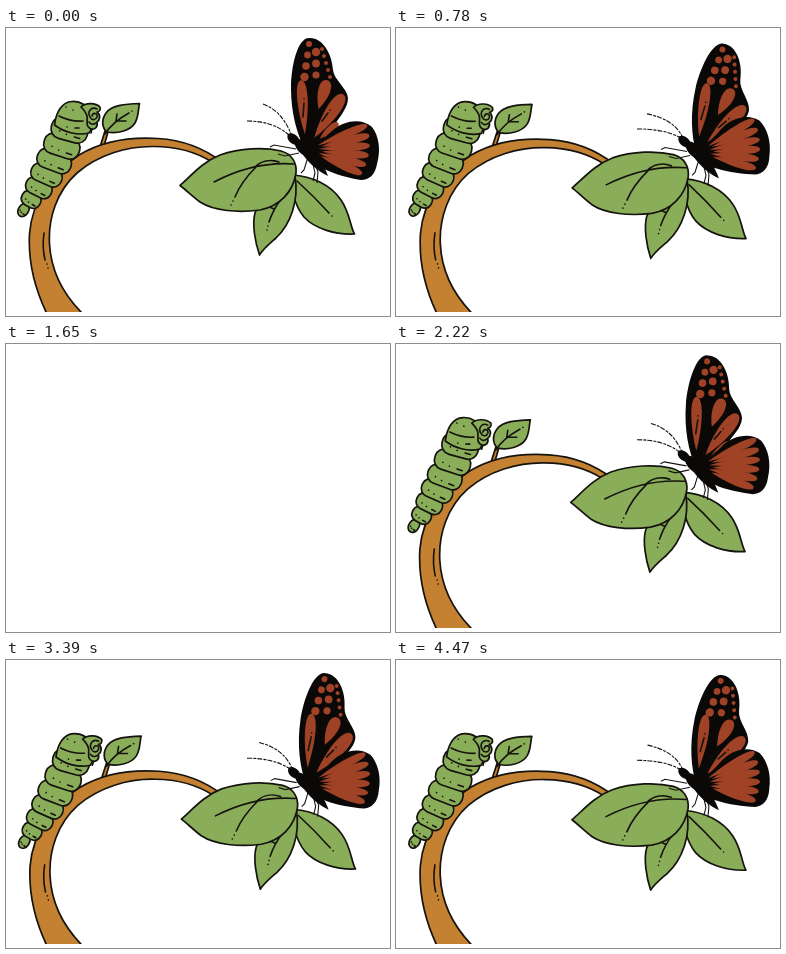
Write an HTML page that moves like this. It is 384 by 288 pixels and loops after 4.5 s.

```html
<!DOCTYPE html>
<html>
<head>
<meta charset="utf-8">
<style>
html, body { margin: 0; width: 100%; height: 100%; overflow: hidden; background: #fff; }
svg { display: block; width: 100vw; height: 100vh; }
.ink { fill: none; stroke: #15130e; stroke-width: 1.6; stroke-linecap: round; stroke-linejoin: round; }
.green { fill: #8aad5a; }
.wood { fill: #c58132; }
.green, .wood { stroke: #15130e; stroke-width: 1.7; stroke-linejoin: round; }
.black { fill: #0b0908; }
.rust { fill: #a04226; }
.thin { fill: none; stroke: #15130e; stroke-width: 1.1; }
</style>
</head>
<body>
<svg viewBox="0 0 384 288">
  <clipPath id="floor"><rect width="384" height="284"/></clipPath>
  <g id="scene" clip-path="url(#floor)">
    <g id="plant">
      <path class="wood" d="M94 119L99 103 102 104 98 118Z"/>
      <path class="wood" d="M42 288C29 262 22 235 23.500 206C26 172 47 144 73 127C98 112 128 109 152 110.500C177 112 199 121 216 134L206 134C190 124 169 118.500 148 118.500C121 118 92 127 71 145C51 163 42 190 43.500 216C45 243 57 267 79 288Z"/>
      <path class="ink" d="M38 205Q36 219 39 232M41 236v.1M42 240v.1"/>
      <path class="green" d="M133.500 75.500C120 76 106 77 100 85C95 92 96 100 101 104C111 106 124 103 129 95C133 88 132 81 133.500 75.500Z"/>
      <path class="ink" d="M99 106C104 98 112 91 123 85M110 93L111 86M111 93L120 93M126 83v.1"/>
      <g id="worm"></g>
      <path class="green" d="M48.500 97C50 84 56 74 66 73.500C75 73 81 78 84 85C87 94 87 101 83 105C71 108 58 104 48.500 97Z"/>
      <path class="ink" d="M53 88Q65 94 77 93M60 79v.1M67 82v.1M61 99v.1M69 100h4"/>
      <path class="green" d="M75 79C80 74 90 75 94 79C95 82 93 84 91 84C95 87 94 92 91 94C92 99 89 102 85 101C79 98 82 94 81 88C80 84 78 82 75 79Z"/>
      <path class="ink" d="M91 81C85 78 81 84 84 89C86 93 90 92 91 89C92 85 87 84 86 88M83 94Q86 98 90 95M86 101L85 105"/>
    </g>
    <g id="leaves">
      <path class="green" d="M286 147C306 148 325 157 335 172C344 185 344 198 348.500 206C330 207 309 201 298 189C288 177 285 160 286 147Z"/>
      <path class="ink" d="M291 153C301 162 313 174 323 185M326 188v.1"/>
      <path class="green" d="M289 148C293 172 285 196 270 210C262 217 257 221 253.500 227C249 214 246 196 249 185C253 172 270 160 289 148Z"/>
      <path class="ink" d="M275 171C269 179 265 188 263 194M262 198v.1M261 202v.1M268 181L259 177"/>
      <path class="green" d="M174 157.500C184 149 196 134 214 127C234 120 258 119 275 123C286 126 291 135 290 145C287 164 274 178 254 182C232 185 208 183 194 174C186 168 180 162 174 157.500Z"/>
      <path class="ink" d="M288 136C260 134 233 141 208 154M250 139C241 148 233 159 229 169M227 173v.1M225 177v.1M249 139C255 133 264 131 273 134"/>
    </g>
    <path id="feelers" class="thin" stroke-dasharray="5 1.200 3 1"/>
    <g id="fly">
      <path class="thin" d="M290 121L268 117 264 119M293 125L279 128 272 126M302 129L298 142 295 145M306 132L309 145 307 153M308 132L312 144 311 155"/>
      <path class="black" d="M299 116C309 121 317 135 322 148C313 144 303 136 295 124Z"/>
      <g id="upper">
        <path class="black" d="M300 123C291 107 285 85 285 60C285 40 291 10 303 10C316 9 326 25 327 42C328 52 341 60 342 70C342 80 334 88 328 98C320 110 310 117 300 123Z"/>
        <g id="panes" class="rust"></g>
        <path class="ink" d="M297 89L298 75M298 71v.1M316 93L322 85M324 82v.1"/>
      </g>
      <g id="lower">
        <path class="black" d="M298 122C308 116 319 110 326 103C338 92 356 90 366 99C373 108 375 122 371 136C369 147 363 152 355 152C343 150 328 146 318 141C308 137 300 130 298 122Z"/>
        <g id="fan" class="rust"></g>
      </g>
      <path class="black" d="M282 106C286 104 291 107 293 111C299 112 305 118 307 126C308 131 305 131 301 129C294 126 290 121 289 117C283 115 280 110 282 106Z"/>
    </g>
  </g>
</svg>
<script>
const $ = id => document.getElementById(id);
const repeat = (n, make) => Array.from({ length: n }, (_, i) => make(i)).join('');
const STEP = 30, LOOP = 4500, SWAY = 1920, BLANK = 1650;

// Body ring; k runs from tail (0) to neck (1)
function ring(k) {
  const x = 17.5 + 46 * k, y = 182 - 60 * k - 20 * k * k;
  const w = 5 + 13.5 * (1 - (1 - k) ** 2.5), h = 7 + 4 * k;
  return `<g transform="translate(${x} ${y}) rotate(${32 - 17 * k})">
    <rect class="green" x="${-w}" y="${-h}" width="${2 * w}" height="${2 * h}" rx="${h * .9}"/>
    <path class="ink" d="M${-w * .5} ${h * .3}v.1M${-w * .1} ${h * .45}v.1M${w * .35} ${h * .5}h${w * .3}"/>
  </g>`;
}

// Teardrop cell of a wing, pointing away from the wing root
const cell = (angle, from, to, w) => {
  const mid = (from + to) / 2;
  return `<path transform="translate(300 122) rotate(${angle})"
    d="M${from} 0C${mid} ${-w} ${to} ${-w} ${to} 0S${mid} ${w} ${from} 0Z"/>`;
};

const dot = (x, y, r) => `<circle cx="${x}" cy="${y}" r="${r}"/>`;

$('worm').innerHTML = repeat(7, i => ring(i / 6));
$('fan').innerHTML = repeat(6, i => cell(-22 + 9 * i, 13 + 3 * (i % 2), 66 - i, 5.4));
$('panes').innerHTML =
  cell(-94, 16, 70, 7) + cell(-73, 43, 73, 8) + cell(-56, 15, 67, 9) + cell(-40, 18, 42, 5) +
  repeat(4, i => dot(303 - 1.5 * i, 16 + 11 * i, 3 + .4 * i)) +
  repeat(3, i => dot(310, 24 + 11.5 * i, 4.2 - .3 * i)) +
  repeat(5, i => dot(316 + 2 * i, 21 + 7 * i, 2));

const move = (id, value) => $(id).setAttribute('transform', value);

function draw(time) {
  const t = Math.floor((time % LOOP) / STEP) * STEP;
  const wave = (1 - Math.cos(2 * Math.PI * t / SWAY)) / 2;
  const p = Math.sin(wave * Math.PI / 2);
  const turn = `rotate(${.7 * p} 55 284)`;

  $('scene').style.display = t === BLANK ? 'none' : '';
  move('plant', turn);
  move('leaves', `translate(${.6 * p} ${p}) ${turn}`);
  move('fly', `translate(${p} ${2.5 * p})`);
  move('upper', `rotate(${12.5 * p} 300 121)`);
  move('lower', `rotate(${-8 * p} 300 121)`);
  $('feelers').setAttribute('d',
    `M${257 - 6 * p} ${76 + 10 * p}Q${276 + p} ${83 + 8 * p} ${285 + p} ${106 + 2 * p}` +
    `M241 ${93 + 8 * p}Q${268 + p} ${93 + 8 * p} ${284 + p} ${108 + 2 * p}`);
}

const start = performance.now();
function tick(now) {
  draw(Math.max(0, now - start));
  requestAnimationFrame(tick);
}
draw(0);
requestAnimationFrame(tick);
</script>
</body>
</html>
```
